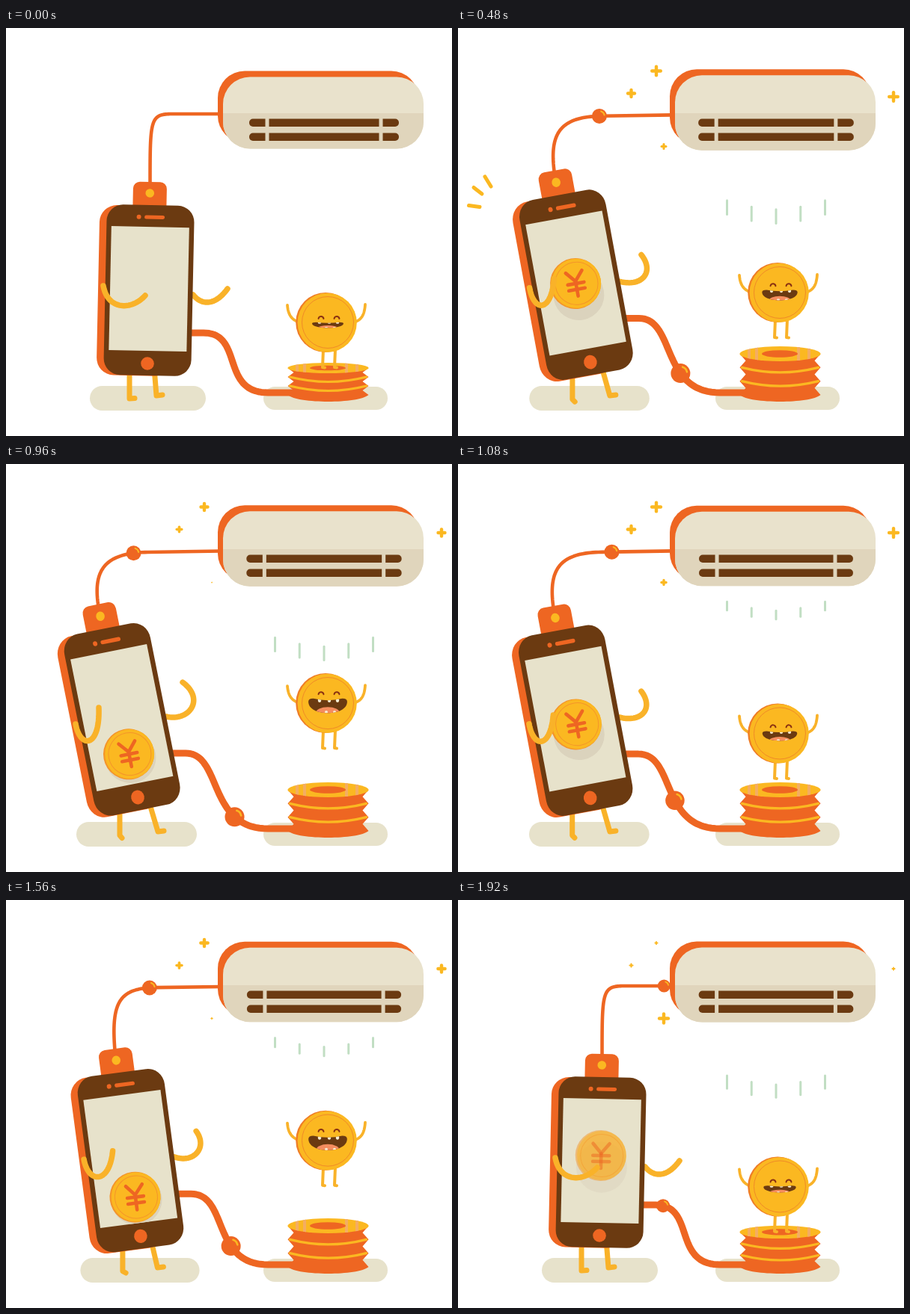
Animation of 596 by 546 pixels, one loop 2.04 s. Source, as an HTML page with a canvas:

```html
<!DOCTYPE html>
<html lang="en">
<head>
<meta charset="utf-8">
<title>Phone and air conditioner</title>
<style>
html, body { margin: 0; width: 100%; height: 100%; overflow: hidden; background: #fff; }
canvas { display: block; }
</style>
</head>
<body>
<canvas id="stage" width="596" height="546"></canvas>
<script>
const ctx = document.getElementById('stage').getContext('2d');
const STEP = 120, STEPS = 17;   // the picture is held for each step
const HOP = 4.9, BREATH = 3.95; // periods in steps
const ORANGE = '#ee6622', BROWN = '#6b3a11', GOLD = '#fbb821', LIMB = '#f9b229', SAND = '#e7e2cb',
      DARK_SAND = '#e0d5bc', MINT = '#c1dec3', TONGUE = '#f58d5f', CREAM = '#f7edd2';

// How far the phone leans back over the loop: step, amount.
const LEAN = [[0, 0], [2, .4], [4, .93], [8, 1], [11, .84], [13, .7], [16, 0]];

const lerp = (a, b, u) => a + (b - a) * u;
const clamp = u => Math.min(1, Math.max(0, u));

function leanAt(k) {
  const i = LEAN.findIndex(([at]) => at >= k);
  if (i < 1) return 0;
  const [[t0, a], [t1, b]] = [LEAN[i - 1], LEAN[i]];
  return lerp(a, b, (k - t0) / (t1 - t0));
}

function fill(color) { ctx.fillStyle = color; ctx.fill(); }

function stroke(color, width) {
  ctx.strokeStyle = color;
  ctx.lineWidth = width;
  ctx.lineCap = ctx.lineJoin = 'round';
  ctx.stroke();
}

function box(x, y, w, h, r, color) {
  ctx.beginPath();
  ctx.roundRect(x, y, w, h, r);
  fill(color);
}

function oval(x, y, rx, ry, color) {
  ctx.beginPath();
  ctx.ellipse(x, y, rx, ry, 0, 0, 7);
  fill(color);
}

const disc = (x, y, r, color) => oval(x, y, r, r, color);

function ring(x, y, r, color, from = 0, to = 7, width = 1) {
  ctx.beginPath();
  ctx.arc(x, y, r, from, to);
  stroke(color, width);
}

function line(points, color, width) {
  ctx.beginPath();
  points.forEach(([x, y]) => ctx.lineTo(x, y));
  stroke(color, width);
}

function bezier(a, b, c, d) {
  return Array.from({ length: 41 }, (_, i) => {
    const u = i / 40, v = 1 - u;
    return [0, 1].map(n => v * v * v * a[n] + 3 * v * v * u * b[n] + 3 * v * u * u * c[n] + u * u * u * d[n]);
  });
}

function along(points, f) {
  const span = i => Math.hypot(points[i + 1][0] - points[i][0], points[i + 1][1] - points[i][1]);
  let total = 0;
  for (let i = 0; i < points.length - 1; i++) total += span(i);
  let left = total * f, i = 0;
  while (i < points.length - 2 && left > span(i)) left -= span(i++);
  const u = left / (span(i) || 1);
  return [lerp(points[i][0], points[i + 1][0], u), lerp(points[i][1], points[i + 1][1], u)];
}

function bead([x, y], r) {
  disc(x, y, r, ORANGE);
  ring(x, y, r * .68, GOLD, -1.25, -.2, r * .2);
}

function hose(k, lean) {
  const x = 246 - 24 * lean, y = 408 - 21 * lean;
  const path = [[x, y],
    ...bezier([x + 18, y], [x + 72 - 5 * lean, y], [286 - 17 * lean, 488], [350, 488]), [385, 488]];
  line(path, ORANGE, 9);
  for (let i = 0; i < 3; i++) {
    const f = .13 * (k - .5 - 4.5 * i);
    if (f > 0 && f < .95) bead(along(path, 1 - f), lerp(13, 9, clamp((f - .5) / .3)));
  }
}

function cable(k, lean, body) {
  const sin = Math.sin(body.angle), cos = Math.cos(body.angle), up = 240 * body.stretch;
  const x = body.x - 1.5 * cos + up * sin, y = body.y - up * cos;
  const path = [
    ...bezier([x, y], [x - 8 * lean, 120 + 20 * lean], [x + 10 * lean, 115 + 4 * lean], [x + 31 + 35 * lean, 115 + 3 * lean]),
    [287, 115 + 1.5 * lean]];
  line(path, ORANGE, 4.6);
  for (let i = 0; i < 3; i++) {
    const age = k - 1 - 4.5 * i, f = 1 - (1 - clamp(age / 7)) ** 1.4;
    if (f > 0 && f < 1) bead(along(path, f), 10 * clamp(.2 + 10 * Math.min(f, 1 - f)));
  }
}

function airUnit(k) {
  const age = (k + BREATH - 1) % BREATH;
  const h = 96 + (6 + 3 * Math.sin((age - .7) * Math.PI / 2)) * Math.min(1, k);
  const y = 113.5 - h / 2;
  box(283, y - 8, 268, h, 36, ORANGE);
  box(290, y, 268, h, 36, '#e9e2cc');
  ctx.save();
  ctx.clip();
  ctx.fillStyle = DARK_SAND;
  ctx.fillRect(290, 114, 268, 60);
  ctx.restore();
  const half = 100 + (h - 96) * .83;
  for (const vent of [121.5, 140.5]) {
    box(425 - half, vent, half * 2, 10.5, 5, BROWN);
    ctx.fillStyle = DARK_SAND;
    for (const side of [-1, 1]) ctx.fillRect(422.5 + side * (half - 24), vent - 1, 5, 13);
  }
  if (k < 1) return;
  const top = 184 + 3 * age + 4.2 * age * age, bottom = 194 + 18.5 * age;
  for (let i = 0; i < 5; i++) {
    const x = 359.5 + i * 32.75, drop = 12 * Math.sin(i * Math.PI / 4);
    line([[x, top + drop], [x, bottom + drop]], MINT, 3);
  }
}

function yenCoin(age) {
  const y = 20 - 127 * (1 - (1 - clamp(age / 2.6)) ** 2);
  const size = lerp(.7, 1, clamp(age / .9));
  ctx.save();
  ctx.globalAlpha = clamp((4 - age) / .2);
  disc(1, y + Math.max(3, (-y - 36) * .22), 34 * size, '#dbd3bd');
  ctx.translate(0, y);
  ctx.scale(size, size);
  disc(-.5, 0, 34, '#f4952a');
  disc(.7, 0, 33, GOLD);
  ring(1, 0, 28.5, '#f4952a');
  line([[-11, -16], [0, -3], [11, -16]], ORANGE, 4.6);
  line([[0, -3], [0, 17]], ORANGE, 4.6);
  for (const bar of [0, 8]) line([[-11, bar], [11, bar]], ORANGE, 4.6);
  ctx.restore();
}

function phone(k, body) {
  ctx.save();
  ctx.translate(body.x, body.y);
  ctx.rotate(body.angle);
  ctx.save();
  ctx.scale(1, body.stretch);
  box(-24, -243, 45, 44, 9, ORANGE);
  disc(-1.5, -228, 5.8, GOLD);
  box(-68, -211, 100, 227.5, 23, ORANGE);
  box(-58.5, -212, 117, 228, 22, BROWN);
  disc(-15.5, -196, 3, ORANGE);
  box(-8, -198.5, 27, 5, 2.5, ORANGE);
  disc(0, 0, 8.8, ORANGE);
  box(-52, -183, 104, 166, 0, SAND);
  ctx.restore();
  ctx.beginPath();
  ctx.rect(-52, -183 * body.stretch, 104, 166 * body.stretch);
  ctx.clip();
  for (const start of [1.4, 7, 12.1]) {
    const age = k - start;
    if (age > 0 && age < 4) yenCoin(age);
  }
  ctx.restore();
}

function phoneLegs(lean) {
  const left = 165 - 13 * lean, right = 201 + 2 * lean;
  line([[left, 458], [left, 496 + lean], [left + 7 - 4 * lean, 495.5 + 5 * lean]], LIMB, 7);
  line([[198 - 6 * lean, 455], [right, 492], [right + 8, 491]], LIMB, 7);
}

function rightArm(lean, raise) {
  const x = 250 - 36 * lean, y = 357 - 19 * lean;
  const hx = x + 46 - 24 * raise, hy = y - 8 - 38 * raise;
  line(bezier([x, y], [x + 12 + 20 * lean, y + 15 - 8 * lean], [hx - 16 + 46 * raise, hy + 22], [hx, hy]), LIMB, 7.5);
}

function leftArm(lean, raise) {
  const x = 130 - 37 * lean, y = 345 + 3 * lean;
  const hx = x + 56 - 25 * lean, hy = y + 13 - 35 * raise;
  line(bezier([x, y], [x + 6, y + 33], [hx - 18 + 20 * raise, y + 33], [hx, hy]), LIMB, 7.5);
}

function pile(top) {
  const base = 491, gap = (base - top) / 3, ry = lerp(10, 7, (top - 436) / 19);
  ctx.beginPath();
  for (let i = 0; i < 7; i++) ctx.lineTo(430.5 - (i % 2 ? 46 : 54), top + gap * i / 2);
  ctx.bezierCurveTo(390, 503, 471, 503, 484.5, base);
  for (let i = 5; i >= 0; i--) ctx.lineTo(430.5 + (i % 2 ? 46 : 54), top + gap * i / 2);
  fill(ORANGE);
  for (const n of [1, 2]) {
    const y = top + gap * n;
    ctx.beginPath();
    ctx.moveTo(379.5, y);
    ctx.quadraticCurveTo(430.5, y + 13, 481.5, y);
    stroke(GOLD, 3.2);
  }
  oval(430.5, top, 54, ry, GOLD);
  ctx.save();
  ctx.clip();
  ctx.fillStyle = '#f4ad62';
  for (const x of [387, 397, 453, 467]) ctx.fillRect(x, top - 12, 4, 24);
  ctx.restore();
  oval(430, top, 24, ry * .48, ORANGE);
}

function mouth(w, h) {
  const top = 3.5 - h / 2, corner = top + h * .22;
  ctx.save();
  ctx.beginPath();
  ctx.moveTo(-w, corner);
  ctx.quadraticCurveTo(-w, top, -w * .75, top);
  ctx.quadraticCurveTo(0, top + h * .25, w * .75, top);
  ctx.quadraticCurveTo(w, top, w, corner);
  ctx.bezierCurveTo(w, top + h * 1.25, -w, top + h * 1.25, -w, corner);
  fill(BROWN);
  ctx.clip();
  oval(0, top + h, w * .62, h * .42, TONGUE);
  for (const x of [-11, 2, 13]) oval(x, top + h * .12, 2.2, h * .15, CREAM);
  for (const x of [-2, 9]) oval(x, top + h * .92, 2, h * .09, CREAM);
  ctx.restore();
}

function hero(y, joy) {
  ctx.save();
  ctx.translate(428, y);
  line(bezier([-52, -23], [-51, -10], [-46, -4], [-38, -1]), LIMB, 3.8);
  line(bezier([52, -24], [51, -10], [47, -4], [39, -1]), LIMB, 3.8);
  for (const x of [-4, 12]) line([[x, 36], [x - 1, 60], [x + 2, 60.5]], LIMB, 4);
  disc(-.8, 0, 40, '#ef7d26');
  disc(1.2, .3, 39.6, GOLD);
  ring(2, 0, 34.5, '#f08a28');
  for (const x of [-7, 14]) ring(x, -4.5 - 7 * joy, 3.5, '#8a3212', 3.3, -.15, 2);
  ctx.translate(2, 0);
  mouth(21 + 5 * joy, 7.5 + 12.5 * joy);
  ctx.restore();
}

function sparkle(x, y, age) {
  if (age < 0) return;
  const t = age % HOP;
  const r = t < 3.3 ? 4.6 * Math.sqrt(t) : 8.3 * (HOP - t) / 1.6;
  const w = Math.min(4.4, r * .7), c = r - w / 2;
  line([[x - c, y], [x + c, y]], GOLD, w);
  line([[x, y - c], [x, y + c]], GOLD, w);
}

function burst(k) {
  const f = (k - 2) / 2;
  if (f <= 0 || f > 1) return;
  for (const [x, y, ex, ey] of [[29, 239.5, 14.5, 237.5], [32, 222, 21, 213.5], [44, 212, 36, 199]])
    line([[x, y], [lerp(x, ex, f), lerp(y, ey, f)]], GOLD, 5);
}

function draw(k) {
  const lean = leanAt(k);
  const body = {
    x: 189 - 13 * lean,
    y: 449 - 3 * lean + 14 * lean * (1 - lean),
    angle: (1.2 - 12.5 * lean) * Math.PI / 180,
    stretch: 1 + .085 * lean * lean
  };
  const raise = lean * (.7 + .3 * Math.cos((k - 3) * Math.PI * 2 / HOP));
  const fall = k % HOP - 3;
  const jump = Math.max(0, 75 - 8 * fall - 27 * fall * fall);
  const coinY = 394 - jump;

  ctx.fillStyle = '#fff';
  ctx.fillRect(0, 0, 596, 546);
  box(112 - 18 * lean, 479, 155 + 6 * lean, 33, 16.5, SAND);
  box(344, 480, 166, 31, 15.5, SAND);
  hose(k, lean);
  cable(k, lean, body);
  airUnit(k);
  phoneLegs(lean);
  rightArm(lean, raise);
  phone(k, body);
  leftArm(lean, raise);
  burst(k);
  pile(Math.max(436, coinY + 61));
  hero(coinY, jump / 75);
  sparkle(265, 57.5, k - 1);
  sparkle(582, 92, k - 1);
  sparkle(231.5, 87.5, k - 1.9);
  sparkle(275, 158.5, k - 3.05);
}

function tick() {
  draw(Math.floor(performance.now() / STEP) % STEPS);
  requestAnimationFrame(tick);
}
tick();
</script>
</body>
</html>
```
